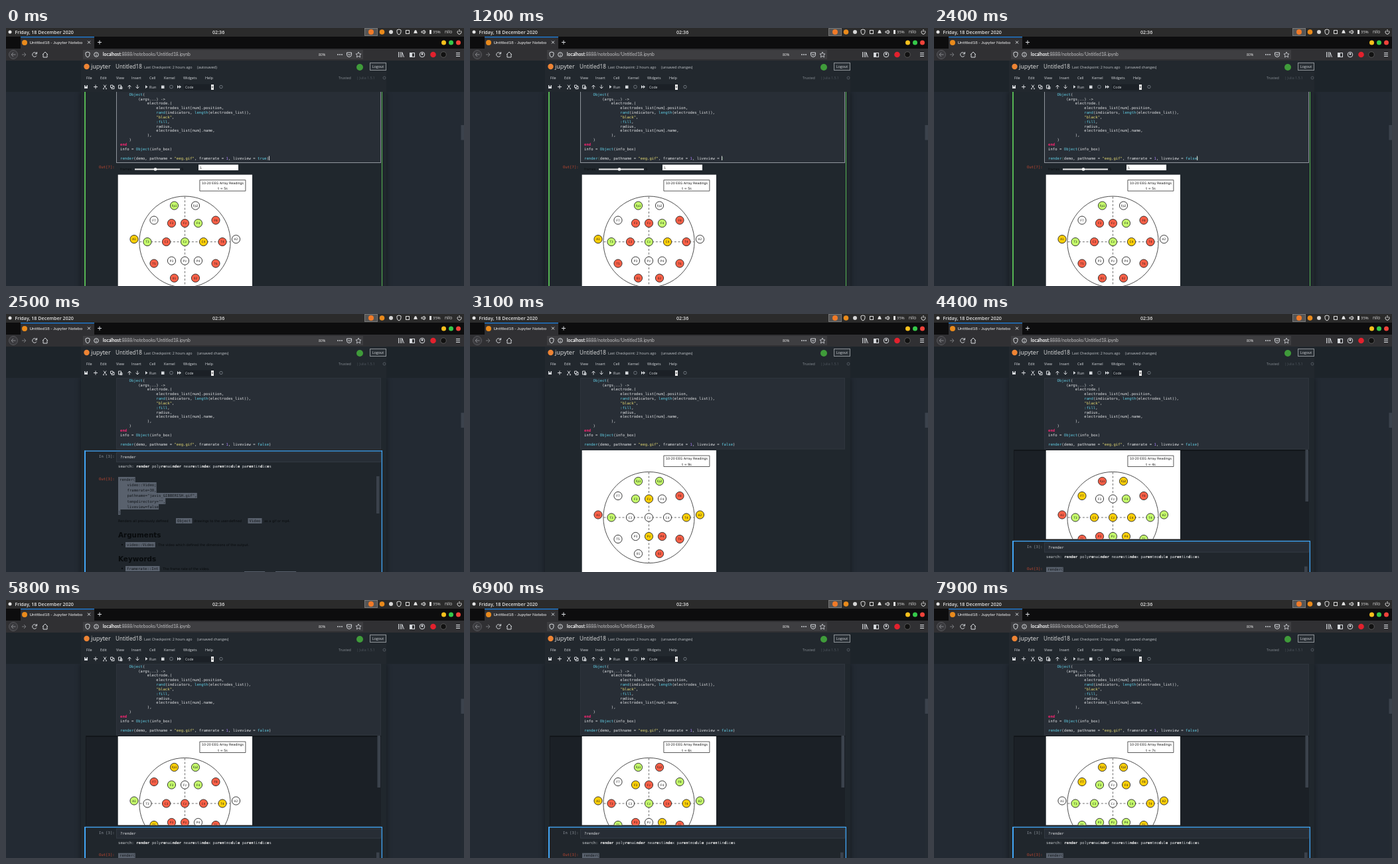
An HTML page with a canvas that plays this animation: 690 px wide and 388 px high, repeating every 8 s.

```html
<!DOCTYPE html>
<html>
<head>
<meta charset="utf-8">
<style>
html, body { margin: 0; width: 100%; height: 100%; overflow: hidden; background: #1d242a; }
canvas { display: block; }
</style>
</head>
<body>
<canvas id="stage" width="690" height="388"></canvas>
<script>
const ctx = document.getElementById('stage').getContext('2d');
const SANS = '"Open Sans", sans-serif', LATO = 'Lato, sans-serif';
const DEJAVU = '"DejaVu Sans", sans-serif', MONO = '"DejaVu Sans Mono", monospace';
const CODE = 5.64, CHAR = CODE * 0.602, LIGHT = '#d6d9dd', BLUE = '#42a5f5', THUMB = '#3b424c';

function text(str, x, y, size, color = LIGHT, font = SANS, weight = 400, align = 'left') {
  ctx.font = `${weight} ${size}px ${font}`;
  ctx.fillStyle = color;
  ctx.textAlign = align;
  ctx.fillText(str, x, y + size * 0.36);
}
function rect(x, y, w, h, fill, stroke) {
  if (fill) { ctx.fillStyle = fill; ctx.fillRect(x, y, w, h); }
  if (stroke) { ctx.strokeStyle = stroke; ctx.lineWidth = 1; ctx.strokeRect(x + .5, y + .5, w - 1, h - 1); }
}
function dot(x, y, r, fill, stroke, width = 1) {
  ctx.beginPath();
  ctx.arc(x, y, r, 0, 7);
  if (fill) { ctx.fillStyle = fill; ctx.fill(); }
  if (stroke) { ctx.strokeStyle = stroke; ctx.lineWidth = width; ctx.stroke(); }
}
function path(d, x, y, color = LIGHT, width = 1, fill = false) {
  ctx.save();
  ctx.translate(x, y);
  const p = new Path2D(d);
  ctx.strokeStyle = ctx.fillStyle = color;
  ctx.lineWidth = width;
  fill ? ctx.fill(p) : ctx.stroke(p);
  ctx.restore();
}
const SHIELD = 'M-3 -3L0 -4L3 -3V0Q3 3 0 4Q-3 3 -3 0Z';
const CROSS = 'M-2 -2L2 2M2 -2L-2 2', PLUS = 'M-3 0H3M0 -3V3';
const ARROW = 'M3.5 0H-3M0 -3L-3 0L0 3';

function desktopBar() {
  rect(0, 0, 690, 13, '#2b2b2b');
  dot(6, 6, 2.5, '#e4e4e4');
  text('Friday, 18 December 2020', 13.5, 6, 7.15, '#e4e4e4', SANS, 600);
  text('02:36', 311, 6, 7.15, '#e4e4e4', SANS, 600);
  rect(540, 0, 20, 12, '#555', '#777');
  dot(550, 6, 4, '#f07a28');
  dot(566.5, 6, 3.8, '#e98a1c');
  dot(580, 6, 3, '#d5d5d5');
  path(SHIELD, 592, 6, '#ddd');
  rect(602, 3, 6, 6, null, '#ddd');
  path('M-3 2Q-2 1 -2 -1Q0 -5 2 -1Q2 1 3 2Z', 617, 6, '#ddd', 1, true);
  path('M-3 -1H-1L1 -3V3L-1 1H-3ZM2 -2Q4 0 2 2', 629, 6, '#ddd');
  rect(638, 3, 3, 6, '#ddd');
  text('35%', 643, 6, 6, '#ddd');
  text('nilo', 661, 6, 6.5, '#ddd');
  path('M-2 -2A3 3 0 1 0 2 -2M0 -4V0', 683, 6, '#ddd');
}

function browser() {
  rect(0, 13, 690, 18, '#0d0d0e');
  rect(22, 13, 111, 18, '#303033');
  rect(22, 13, 111, 1.2, '#1b84e8');
  dot(28, 22, 4, '#e98a1c');
  text('Untitled18 - Jupyter Notebo', 35.5, 21.5, 6.4, '#f4f4f4', LATO);
  path(CROSS, 125, 21.5);
  path(PLUS, 141, 21.5);
  ['#f8c01c', '#35c94a', '#f0433a'].forEach((c, i) => dot(659.5 + i * 11, 22, 3.5, c));

  rect(0, 31, 690, 18, '#303033');
  dot(11, 40, 6.5, '#3b3b3f', '#58585c');
  path(ARROW, 11, 40, '#85868a');
  path('M-3 0H3M0 -3L3 0L0 3', 27, 40, '#77787c');
  path('M3 -1.5A3.3 3.3 0 1 0 3 1.5M3.5 -4V-1H.5', 43, 40);
  path('M-4 0L0 -4L4 0M-3 -1V4H3V-1', 59, 40);
  rect(116, 33, 422, 14, '#3e3e41');
  path(SHIELD, 123, 40);
  dot(136, 40, 3.3, null, LIGHT);
  path('M0 -2V-1M0 0V2', 136, 40);
  text('localhost:8888/notebooks/Untitled18.ipynb', 146, 40, 6.8, '#c2c2c4', LATO);
  text('localhost', 146, 40, 6.8, '#f6f6f6', LATO);
  text('80%', 471, 40, 5.2, '#eee');
  for (const x of [500, 503, 506]) dot(x, 40, .9, LIGHT);
  path('M-3.5 -3H3.5V0A3.5 3.5 0 0 1 -3.5 0ZM-2 -1L0 1L2 -1', 517, 40);
  path('M0 -4L1.2 -1.2L4 -1L2 1L2.6 4L0 2.4L-2.6 4L-2 1L-4 -1L-1.2 -1.2Z', 531, 40, LIGHT, .8);
  path('M-3.5 -4V4M-1 -4V4M1.3 -4V4M2 -3L4.5 4', 595, 40);
  rect(608, 37, 8, 7, null, LIGHT);
  rect(609, 38, 3, 5, LIGHT);
  dot(627, 40, 3.8, null, LIGHT);
  dot(627, 39, 1.5, LIGHT);
  dot(643.5, 40, 4.3, '#e3212d');
  dot(659, 40, 4.3, '#111', '#555');
  path('M-3 -2.5H3M-3 0H3M-3 2.5H3', 681, 40);
}

function notebookHeader(unsaved) {
  rect(0, 49, 690, 47, '#1d242a');
  rect(113, 49, 460, 47, '#22282e');
  dot(121.5, 58, 4.2, '#ee8434');
  text('jupyter', 128, 58, 9, '#e6e6e6');
  text('Untitled18', 165, 58.5, 8.2, '#e0e0e0');
  text('Last Checkpoint: 2 hours ago', 208, 58.7, 5.4, '#c4c8cc');
  text(unsaved ? '(unsaved changes)' : '(autosaved)', 288, 58.7, 5.5, '#c4c8cc');
  dot(533, 59, 5, '#3f9b3a');
  rect(548, 52, 25, 12, '#2a3036', '#8c9196');
  text('Logout', 560.5, 58, 5.4, LIGHT, SANS, 400, 'center');
  const menu = { File: 121, Edit: 142, View: 166, Insert: 189, Cell: 216, Kernel: 238, Widgets: 267, Help: 300 };
  for (const name in menu) text(name, menu[name], 75, 5.5);
  text('Trusted', 501, 75, 5.3, '#8a9097');
  text('| Julia 1.5.1', 528, 75, 5.3, '#4f565e');
  dot(570, 75, 2, null, '#4f565e');

  rect(118, 86, 5, 5, LIGHT);
  rect(119.5, 86, 2, 2, '#22282e');
  path(PLUS, 135, 88.5);
  path('M-2 -3L2 2M2 -3L-2 2M-3 3H-1M1 3H3', 149, 88.5);
  path('M-2.5 -2.5H1V1H-2.5ZM-1 1V3H3V-1H1', 160, 88.5);
  path('M-2.5 -2.5H1.5V2.5H-2.5ZM0 0H3V3H0Z', 172, 88.5);
  path('M0 3V-2.5M-2.5 0L0 -2.5L2.5 0', 186, 88.5);
  path('M0 -3V2.5M-2.5 0L0 2.5L2.5 0', 198, 88.5);
  path('M-1.5 -2.5L2 0L-1.5 2.5Z', 211.5, 88.5, LIGHT, 1, true);
  text('Run', 216, 88.5, 5.6);
  rect(234, 86.5, 4.5, 4.5, LIGHT);
  dot(249, 88.5, 2.4, null, '#6c737b');
  path('M-3 -2.5L0 0L-3 2.5ZM0 -2.5L3 0L0 2.5Z', 261, 88.5, LIGHT, 1, true);
  rect(268, 84.5, 45, 9, '#1b2026');
  text('Code', 270, 88.7, 5.2);
  rect(309, 85, 4, 8, '#eee');
  path('M-1.3 -.8H1.3L0 1Z', 311, 89, '#222', 1, true);
  dot(324, 88.5, 2.2, null, '#6c737b');
}

const SYNTAX = /("[^"]*")|(:fill|\b(?:Object|rand|length|render|true|false)\b)|(\b1\b)|(\bend\b)|[^\s"]/g;
function code(line, x, y, dimAt = []) {
  for (const m of line.matchAll(SYNTAX)) {
    const color = m[1] ? '#e6db74' : m[2] ? '#62cfe6' : m[3] ? '#ae81ff' : m[4] ? '#f92672' : '#e4e6e8';
    text(m[0], x + m.index * CHAR, y, CODE, dimAt.includes(m.index) ? '#5b8a66' : color, MONO, m[4] ? 700 : 400);
  }
}
const LINES = [
  '    Object(', '        (args...) ->', '            electrode.(',
  '                electrodes_list[num].position,',
  '                rand(indicators, length(electrodes_list)),',
  '                "black",', '                :fill,', '                radius,',
  '                electrodes_list[num].name,', '            ),', '    )', 'end', 'info = Object(info_box)'
];

function typedValue(t) {
  if (t < 1000) return 'true'.slice(0, 4 - Math.max(0, Math.floor((t - 500) / 100)));
  return 'false'.slice(0, Math.max(0, Math.floor((t - 1200) / 160)));
}
function codeCell(t, editing) {
  rect(166, 96, 399, 107.5, '#282e36', editing ? null : '#2e353d');
  if (editing) {
    ctx.strokeStyle = '#8f959c';
    ctx.lineWidth = 1;
    ctx.strokeRect(166.5, 90.5, 398, 112);
    rect(118, 96, 2, 292, '#56b453');
    rect(566, 96, 1, 292, '#56b453');
  }
  LINES.forEach((line, i) => code(line, 172, 99.8 + i * 6.83));
  const call = `render(demo, pathname = "eeg.gif", framerate = 1, liveview = ${editing ? typedValue(t) : 'false'})`;
  const matching = editing && t > 300;
  code(call, 172, 195.6, matching ? [6, call.length - 1] : []);
  if (editing && t % 1000 < 500) rect(172 + (call.length - (matching ? 1 : 0)) * CHAR, 192.5, .8, 6.5, '#fff');
}

function slider() {
  text('Out[7]:', 140, 209, CODE, '#bd4630', MONO);
  text('frames', 172, 212.5, 5, '#0c0f12', DEJAVU);
  rect(194, 211.5, 68, 2, '#eee');
  dot(225, 212.5, 2.3, '#fff');
  text('5', 264, 212.5, 5, '#0c0f12', DEJAVU);
  rect(290, 205.5, 60, 8.5, '#fff');
  text('5', 292, 210, 4.6, '#333', MONO);
}

// Electrode name and offset from the head centre
const CAP = [
  ['Fp1', -16, -54.5], ['Fp2', 16, -54.5], ['F7', -46.5, -32.5], ['F3', -20, -28], ['Fz', 0, -28],
  ['F4', 20, -28], ['F8', 46.5, -32.5], ['A1', -76.5, -4], ['T3', -56.5, 0], ['C3', -28, 0],
  ['Cz', 0, 0], ['C4', 28, 0], ['T4', 56.5, 0], ['A2', 77, -4], ['T5', -46.5, 32.5],
  ['P3', -20, 28.5], ['Pz', 0, 28.5], ['P4', 20, 28.5], ['T6', 46.5, 32.5], ['O1', -16, 54.5], ['O2', 16, 54.5]
];
const FILL = { w: '#fff', y: '#ffd008', g: '#c6ff6c', r: '#ff6047' };
const READINGS = {
  3: 'wgryrwygwrygwrgywrgww', 4: 'ryywwgrrgyyyggrrgygww', 5: 'ygrgwgrgwrrrywyrrwrww',
  6: 'grwyrwgyrwgryggrwyrww', 7: 'yyygwyywggwgyyggggyww', 9: 'ggwgywrrgwwwyywwyrrwr'
};
const FIRST = 'gwwrrgrygrgyrwrwwwrrr';

function eeg(top, second, reading) {
  const cx = 269.5, cy = top + 101;
  rect(168.7, top, 202.3, 202, '#fff');
  path('M-34.6 0H34.4V16.5H-34.6Z', 326.5, top + 8, '#333', .8);
  text('10-20 EEG Array Readings', 326.5, top + 12.5, 4.8, '#111', DEJAVU, 400, 'center');
  text(`t = ${second}s`, 326.5, top + 20.8, 4.8, '#111', DEJAVU, 400, 'center');
  dot(cx, cy, 68.6, null, '#222', .8);
  ctx.setLineDash([3, 2.6]);
  path('M0 -68V68M-68 0H68', cx, cy, '#333', .7);
  ctx.setLineDash([]);
  CAP.forEach(([name, x, y], i) => {
    dot(cx + x, cy + y, 6.1, FILL[reading[i]], '#222', .9);
    text(name, cx + x, cy + y, 4.5, '#222', MONO, 400, 'center');
  });
}

function highlight(x, y, right) {
  const top = Math.round(y - 4.1);
  rect(x, top, right - x, Math.round(y + 4.1) - top, '#59616d');
}
function chip(str, x, y) {
  highlight(x, y, x + str.length * CHAR + 4);
  text(str, x + 2, y, CODE, '#14181c', MONO);
}
// Asterisks toggle bold
function boldText(str, x, y) {
  str.split('*').forEach((part, i) => {
    text(part, x, y, CODE, i % 2 ? '#fff' : '#cfd3d7', MONO, i % 2 ? 700 : 400);
    x += part.length * CHAR;
  });
}
const SIGNATURE = [
  'render(', '    video::Video;', '    framerate=30,', '    pathname="javis_GIBBERISH.gif",',
  '    tempdirectory="",', '    liveview=false', ')'
];
function helpCell(top) {
  ctx.save();
  ctx.translate(0, top - 206);
  rect(118, 205.5, 449, 400, '#20262c');
  rect(118, 205.4, 449, 1.3, BLUE);
  rect(118, 205.4, 2, 400, BLUE);
  rect(565.7, 205.4, 1.3, 400, BLUE);
  text('In [3]:', 140, 214.3, CODE, '#8d949c', MONO);
  rect(166, 208, 399, 15, '#272d35', '#323941');
  text('?render', 172, 215.3, CODE, '#e4e6e8', MONO);
  boldText('search: *render* poly*re*mai*nder* nea*re*sti*nde*x pa*ren*tmo*d*ul*e* pa*ren*tin*d*ic*e*s', 169, 229);
  text('Out[3]:', 140, 247.5, CODE, '#bd4630', MONO);
  SIGNATURE.forEach((line, i) => {
    const y = 248.6 + i * 8.22, x = i ? 169 : 171;
    highlight(169, y, x + line.length * CHAR);
    text(line, x, y, CODE, '#14181c', MONO);
  });
  rect(558, 244, 4.5, 56, THUMB);
  const note = (str, x, y) => text(str, x, y, 5, '#080b0d', DEJAVU);
  note('Renders all previously defined', 169, 311);
  chip('Object', 256, 311);
  note('drawings to the user-defined', 283, 311);
  chip('Video', 364.5, 311);
  note('as a gif or mp4.', 389, 311);
  text('Arguments', 169, 332, 10.4, '#080b0d', DEJAVU, 700);
  dot(175, 347, 1.1, '#080b0d');
  chip('video::Video', 180, 347);
  note(': The video which defined the dimensions of the output.', 226, 347);
  text('Keywords', 169, 368, 10.4, '#080b0d', DEJAVU, 700);
  dot(175, 382.7, 1.1, '#080b0d');
  chip('framerate::Int', 180, 382.7);
  note(': The frame rate of the video.', 233, 382.7);
  chip('pathname', 359, 391);
  chip('liveview', 406, 391);
  ctx.restore();
}

function scrolledOutput(t) {
  const second = Math.min(7, 3 + Math.floor((t - 3300) / 1000));
  rect(120, 204, 445, 135, '#1b2026');
  rect(120, 204, 445, 2, '#12161a');
  rect(120, 204, 1, 135, '#14181c');
  ctx.save();
  ctx.beginPath();
  ctx.rect(120, 204, 445, 134.5);
  ctx.clip();
  eeg(205, second, READINGS[second]);
  ctx.restore();
  rect(559.5, 204, 4.5, 78, THUMB);
  helpCell(341.6);
}

function page() {
  rect(0, 0, 690, 388, '#232a33');
  ctx.save();
  ctx.shadowColor = 'rgba(0, 0, 0, .45)';
  ctx.shadowBlur = 8;
  rect(113, 96, 460, 400, '#20272d');
  ctx.restore();
}

function draw(t) {
  const editing = t < 2500;
  page();
  codeCell(t, editing);
  if (editing) {
    slider();
    eeg(220.6, 5, FIRST);
  } else if (t < 3000) helpCell(206);
  else if (t < 3300) eeg(205, 9, READINGS[9]);
  else scrolledOutput(t);
  rect(685, 96, 5, 292, '#242b33');
  rect(685.5, editing ? 146 : 148.5, 4.5, 22.5, THUMB);
  notebookHeader(t >= 500);
  browser();
  desktopBar();
}
function frame() {
  draw(performance.now() % 8000);
  requestAnimationFrame(frame);
}
frame();
</script>
</body>
</html>
```
